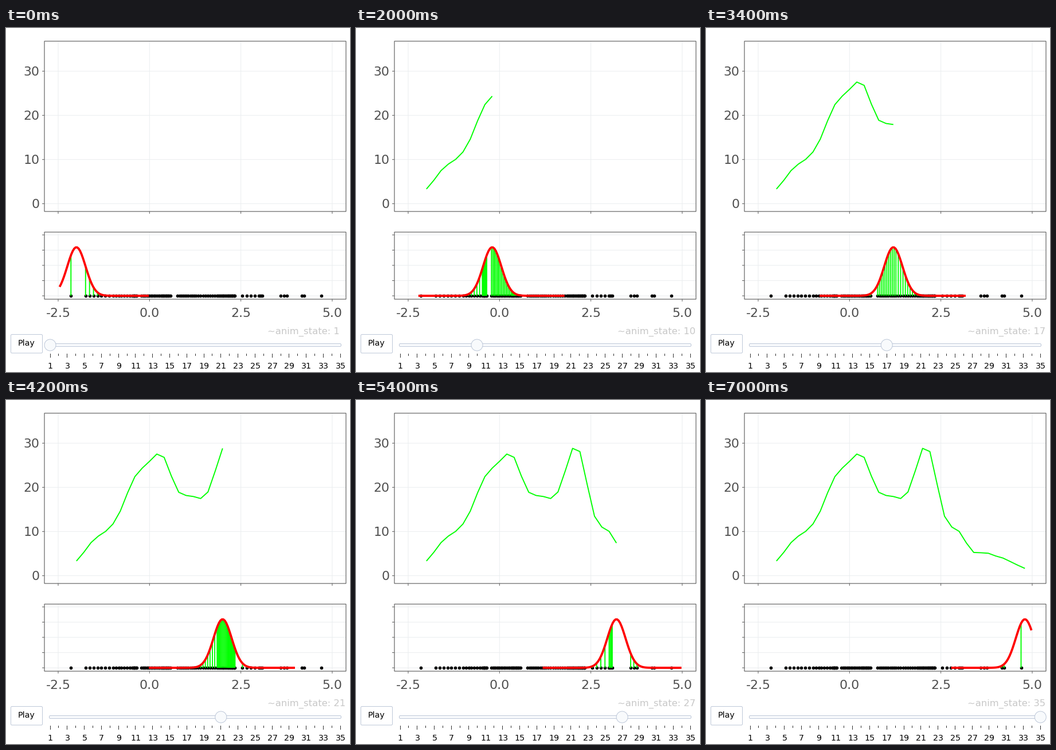
Write a matplotlib script that moves like this. It is 600 px wide and 600 px high and loops after 7.2 s.

```python
import numpy as np
import matplotlib.pyplot as plt
from matplotlib.animation import FuncAnimation
from matplotlib.collections import LineCollection
from matplotlib.patches import Circle, FancyBboxPatch, Rectangle

SIZE, DPI = 600, 100
PT = 72 / DPI  # points per pixel
STATES, SAMPLES = 35, 100
SIGMA = 0.25
GREEN, RED = "#00ff00", "#ff0000"
BORDER, GRID, TICK, LABEL = "#555555", "#ebeef0", "#606060", "#4d4d4d"
TRACK_EDGE, TRACK_FILL = "#bec8d9", "#f8fafc"

# Key (rank, value) pairs of the sorted sample; the rest lie evenly between
KNOTS = [(0, -2.15), (1, -1.75), (8, -0.99), (15, -0.47), (21, -0.35),
         (22, -0.22), (28, 0.0), (36, 0.32), (46, 0.57), (47, 0.77),
         (57, 1.27), (66, 1.85), (76, 2.145), (85, 2.34), (86, 2.545),
         (90, 3.0), (93, 3.085), (94, 3.59), (96, 3.76), (97, 4.17),
         (98, 4.23), (99, 4.695)]


def kernel(x, c):
    return np.exp(-((x - c) / SIGMA) ** 2 / 2) / (SIGMA * np.sqrt(2 * np.pi))


DATA = np.interp(np.arange(SAMPLES), *zip(*KNOTS))
CENTERS = -2 + 0.2 * np.arange(STATES)
DENSITY = kernel(DATA[:, None], CENTERS).sum(axis=0)
GRID_X = np.arange(-2.46, 4.99, 0.04)


def px(x):
    return 250.3 + 63.73 * np.asarray(x)


def top_y(v):
    return 306.4 - 7.703 * np.asarray(v)


def low_y(v):
    return 467.1 - 53.1 * np.asarray(v)


def slider_x(state):
    return 77 + 14.89 * (state - 1)


plt.rcParams["font.family"] = "DejaVu Sans"
plt.rcParams["path.snap"] = False
fig = plt.figure(figsize=(SIZE / DPI, SIZE / DPI), dpi=DPI, facecolor="white")
ax = fig.add_axes([0, 0, 1, 1])
ax.set_xlim(0, SIZE)
ax.set_ylim(SIZE, 0)
ax.axis("off")


def line(x, y, color, width=1, z=1):
    return ax.plot(x, y, color=color, lw=width * PT, zorder=z,
                   solid_capstyle="butt", solid_joinstyle="round")[0]


def text(x, y, s, size, color="black", ha="center"):
    return ax.text(x, y, s, fontsize=size * PT, color=color, ha=ha,
                   va="baseline")


def panel(top, bottom, rows):
    left, right = 67, 593
    for x in px([-2.5, 0, 2.5, 5]):
        line([x, x], [top, bottom], GRID)
        line([x, x], [bottom, bottom + 4], TICK)
    for y in rows:
        line([left, right], [y, y], GRID)
        line([left - 4, left], [y, y], TICK)
    ax.add_patch(Rectangle((left, top), right - left, bottom - top, fill=False,
                           ec=BORDER, lw=1.1 * PT, zorder=8))


def rounded(x, y, w, h, r, fill):
    ax.add_patch(FancyBboxPatch((x, y), w, h, fc=fill, ec=TRACK_EDGE, lw=PT,
                                boxstyle=f"round,pad=0,rounding_size={r}"))


# Panels and axis labels
panel(23, 320, top_y([0, 10, 20, 30]))
panel(356, 473, low_y([0, 0.5, 1, 1.5, 2]))
for v in (0, 10, 20, 30):
    text(58.5, top_y(v) + 8, str(v), 22, LABEL, "right")
for v in (-2.5, 0.0, 2.5, 5.0):
    text(px(v), 504, f"{v:.1f}", 22, LABEL)

# Button and slider
rounded(8.5, 534.5, 55, 32.5, 2, "white")
text(35, 554, "Play", 14.3)
rounded(75.5, 550.5, 509, 5, 2, TRACK_FILL)
for s in range(1, STATES + 1):
    x = np.floor(slider_x(s)) + 0.5
    major = s % 2 == 1
    line([x, x], [568, 575 if major else 572], "#333333")
    if major:
        text(slider_x(s) + 0.5, 594, str(s), 14.3)

# Moving parts
ax.scatter(px(DATA), np.full(SAMPLES, low_y(0)), s=(5.7 * PT) ** 2,
           color="black", lw=0, zorder=3, snap=False)
stems = LineCollection([], colors=GREEN, lw=1.9 * PT, zorder=4)
ax.add_collection(stems)
bell = line([], [], RED, 3.8, 5)
curve = line([], [], GREEN, 1.9, 5)
handle = Circle((77, 553), 10, fc=TRACK_FILL, ec=TRACK_EDGE, lw=PT, zorder=6)
ax.add_patch(handle)
status = text(455.5, 534, "", 16.4, "#c8c8c8", "left")


def update(i):
    state = i + 1 if i < 8 else i  # state 8 is held twice as long
    c = CENTERS[state - 1]
    heights = low_y(kernel(DATA, c))
    stems.set_segments([[(x, low_y(0)), (x, y)]
                        for x, y in zip(px(DATA), heights)])
    xs = GRID_X[np.abs(GRID_X - c) <= 2.02]
    bell.set_data(px(xs), low_y(kernel(xs, c)))
    curve.set_data(px(CENTERS[:state]), top_y(DENSITY[:state]))
    handle.center = (slider_x(state), 553)
    status.set_text(f"~anim_state: {state}")
    return stems, bell, curve, handle, status


anim = FuncAnimation(fig, update, frames=36, interval=200, repeat=True,
                     repeat_delay=0, blit=False)
plt.show()
```
